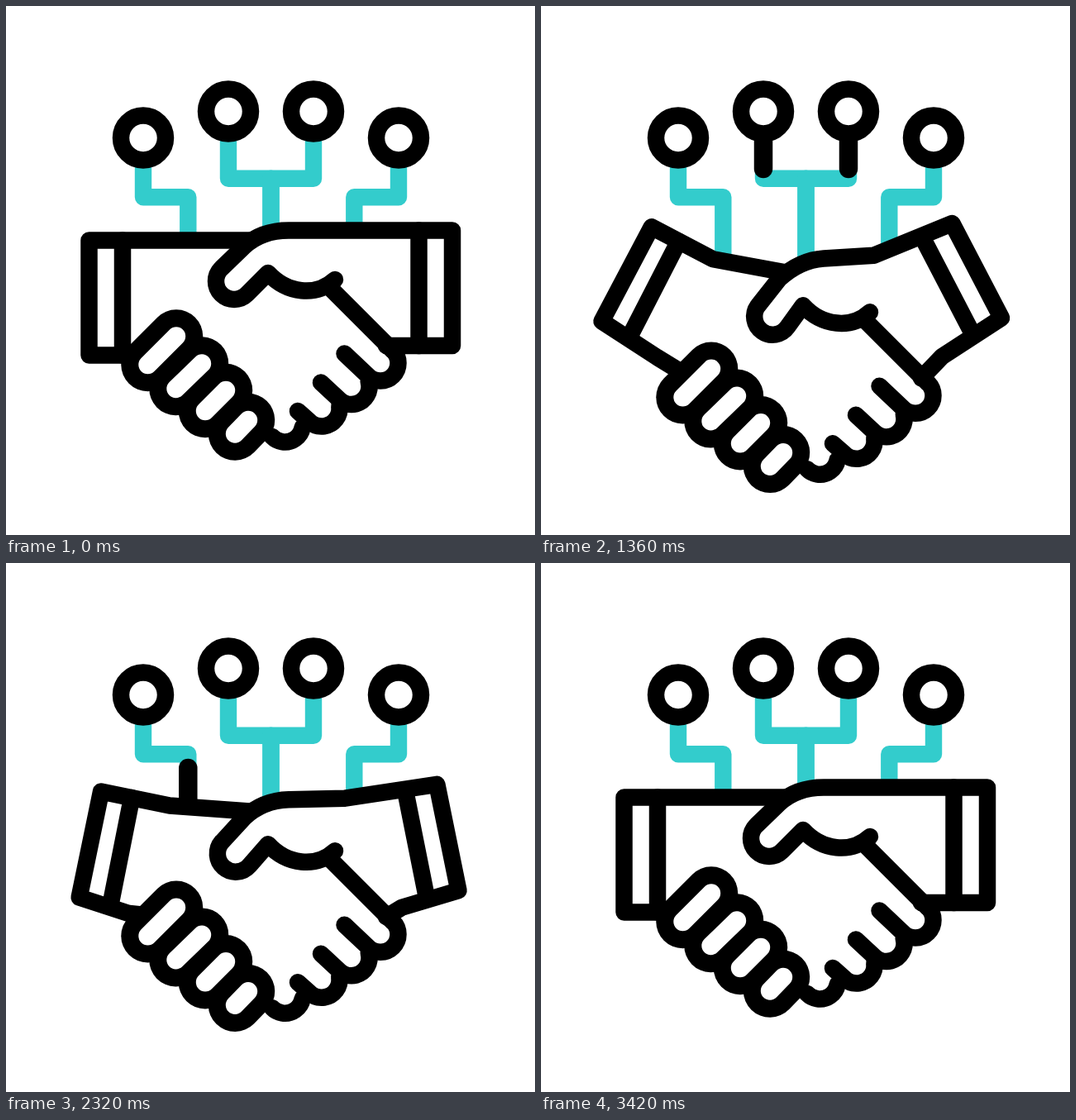
An HTML page with a canvas that plays this animation: 640 px wide and 640 px high, repeating every 3.6 s.

```html
<!DOCTYPE html>
<html>
<head>
<meta charset="utf-8">
<title>Handshake</title>
<style>
html, body { margin: 0; width: 100%; height: 100%; overflow: hidden; background: #fff; }
canvas { display: block; }
</style>
</head>
<body>
<canvas id="stage" width="640" height="640"></canvas>
<script>
const ctx = document.getElementById('stage').getContext('2d');
const LOOP = 3600, SHAKE = 1075, DROP = 63.2, TEAL = '#33cccc', DEG = Math.PI / 180;
ctx.lineCap = ctx.lineJoin = 'round';

// hop: start, peak, end; pulse: head start, tail start (ms)
const nodes = [
  { x: 166, y: 159.5, wire: [220.3, 325, 220.3, 231.3, 166, 231.3], hop: [2716, 3070, 3420], rise: 47, pulse: [2240, 2470] },
  { x: 269, y: 127.5, wire: [320.5, 325, 320.5, 208.7, 269, 208.7], hop: [1450, 1850, 2180], rise: 47.5, pulse: [670, 1172] },
  { x: 372, y: 127.5, wire: [320.5, 325, 320.5, 208.7, 372, 208.7], hop: [1450, 1850, 2180], rise: 47.5, pulse: [670, 1172] },
  { x: 475, y: 159.5, wire: [421.3, 325, 421.3, 231.3, 475, 231.3], hop: [500, 890, 1220], rise: 47, pulse: [40, 269] }
];

// Capsule ends of the left hand's fingers
const leftFingers = [
  [206, 399.5, 171.5, 434], [237, 432.5, 205.5, 463],
  [266, 465, 241, 490], [293, 501, 277, 517.5]
];
// Right hand's fingertips: centre, end of the crease, start angle
const rightFingers = [
  [453, 432, 409.5, 420.5, -45], [418, 460.5, 381, 455.5, -15],
  [382, 487, 353, 490, -8], [337.5, 506, 322, 521, 10]
];

const smooth = x => { x = Math.min(1, Math.max(0, x)); return x * x * (3 - 2 * x); };

function shakeAt(t) {
  if (t >= SHAKE * 3) return 0;
  t %= SHAKE;
  return t < 487 ? smooth((t - 6) / 481) : 1 - smooth((t - 487) / 568);
}

function hopAt(t, [start, peak, end]) {
  if (t <= start || t >= end) return 0;
  const x = t < peak ? (peak - t) / (peak - start) : (t - peak) / (end - peak);
  return 1 - x ** 2.5;
}

function stroke(color, width) {
  ctx.strokeStyle = color;
  ctx.lineWidth = width;
  ctx.stroke();
}

function polyline(p) {
  ctx.beginPath();
  for (let i = 0; i < p.length; i += 2) ctx.lineTo(p[i], p[i + 1]);
}

function drawWire({ x, y, wire, pulse }, t, lift) {
  polyline([...wire, x, y - lift]);
  ctx.lineCap = 'butt';
  stroke(TEAL, 20.4);
  ctx.lineCap = 'round';
  const length = wire[1] - wire[3] + Math.abs(x - wire[0]) + wire[5] - y;
  const [head, tail] = pulse.map(start => Math.min(length, Math.max(0, (t - start) * 0.95)));
  if (head <= tail) return;
  ctx.setLineDash([head - tail, 999]);
  ctx.lineDashOffset = -tail;
  stroke('#000', 22.5);
  ctx.setLineDash([]);
}

function drawNode({ x, y }, lift) {
  ctx.beginPath();
  ctx.arc(x, y - lift, 27, 0, 7);
  ctx.fill();
  stroke('#000', 20.5);
}

function drawHands(u) {
  // A point at rest plus its shift at the bottom of the shake
  const at = (x, y, dx = 0, dy = DROP) => [x + dx * u, y + dy * u];
  const line = (...points) => polyline(points.flat());
  const ink = () => stroke('#000', 20.5);

  line(at(180, 410), at(152, 422.5, -18.5, 4), at(100.5, 422.5, -43.5, -66),
    at(100.5, 283.5, 53.5, -26), at(190, 283.5, 29, 36.5), at(298, 283.5));
  ctx.fill();
  ink();
  line(at(141, 283.5, 41, 2), at(141, 422.5, -52, -40.5));
  ink();

  const left = at(260.5, 317.5, 3, 73), right = at(291.5, 348.5, 10.5, 64);
  line(at(460, 411), at(474, 411, 18, 21), at(540, 411, 27.5, -54),
    at(540, 271.5, -68.5, -13.5), at(416, 271.5, -21.5, 48.5), at(342, 271.5, 0, 54.5));
  ctx.bezierCurveTo(...at(320, 271.5, 0, 57), ...at(302, 278), ...at(288, 291));
  ctx.lineTo(...left);
  const turn = Math.atan2(left[1] - right[1], left[0] - right[0]);
  ctx.arc((left[0] + right[0]) / 2, (left[1] + right[1]) / 2, 22, turn, turn - Math.PI, true);
  ctx.lineTo(...at(317, 323));
  ctx.bezierCurveTo(...at(340, 348), ...at(375, 352), ...at(398, 331));
  ctx.fill();
  ink();
  line(at(499.5, 271.5, -60, 16), at(499.5, 411, 33.5, -28.5));
  ink();

  ctx.save();
  ctx.translate(0, DROP * u);
  polyline([392, 341, 468, 417]);
  ink();
  for (const [x, y, creaseX, creaseY, from] of rightFingers) {
    ctx.beginPath();
    ctx.arc(x, y, 21.5, from * DEG, 135 * DEG);
    ctx.lineTo(creaseX, creaseY);
    ink();
  }
  for (const [color, width] of [['#000', 64.5], ['#fff', 22.4]])
    for (const finger of leftFingers) {
      polyline(finger);
      stroke(color, width);
    }
  ctx.restore();
}

function draw(now) {
  const t = now % LOOP;
  ctx.fillStyle = '#fff';
  ctx.fillRect(0, 0, 640, 640);
  const lifts = nodes.map(n => n.rise * hopAt(t, n.hop));
  nodes.forEach((n, i) => drawWire(n, t, lifts[i]));
  nodes.forEach((n, i) => drawNode(n, lifts[i]));
  drawHands(shakeAt(t));
}

const begin = performance.now();
function tick() {
  draw(performance.now() - begin);
  requestAnimationFrame(tick);
}
tick();
</script>
</body>
</html>
```
